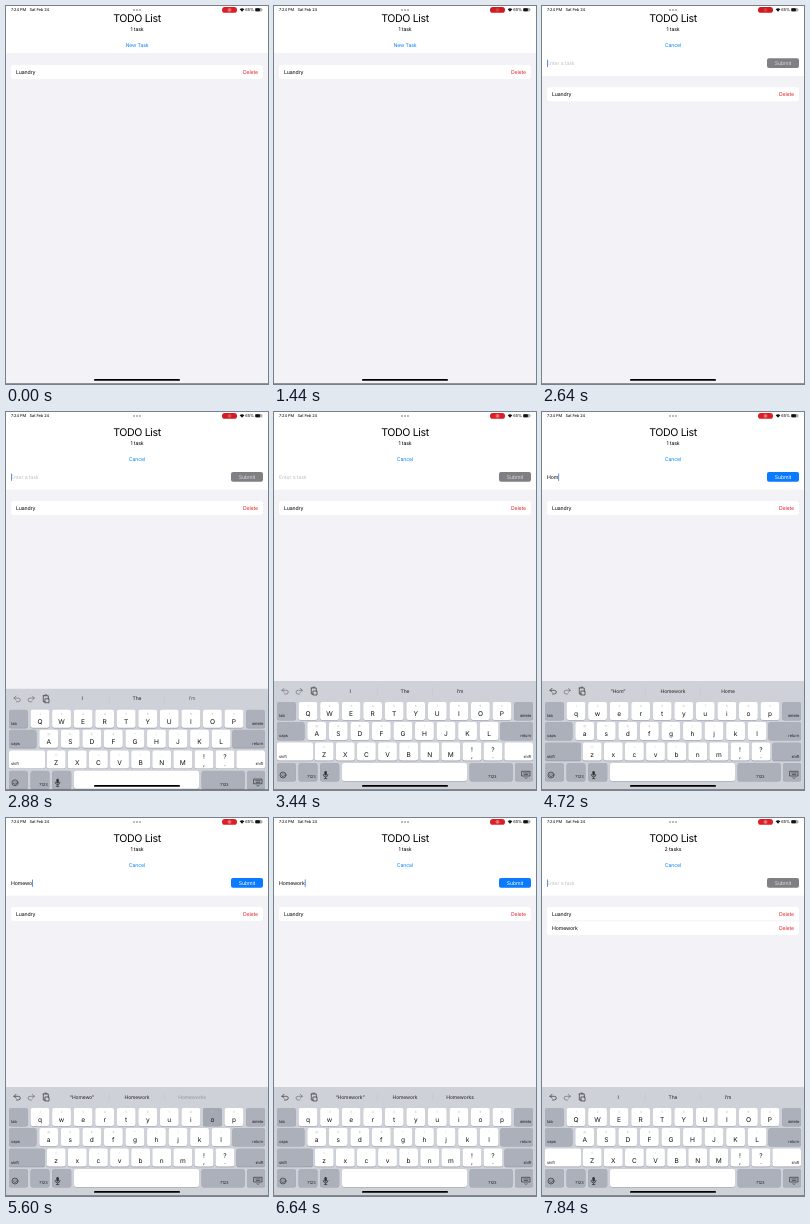
Animation, 262 px wide and 378 px high, one loop 8 s. Source, as an HTML page:

```html
<!DOCTYPE html>
<html lang="en">
<head>
<meta charset="utf-8">
<title>TODO List</title>
<style>
html, body { margin: 0; width: 100%; height: 100%; overflow: hidden; background: #f2f2f7; }
svg { display: block; width: 262px; height: 378px; }
text { font: 5.2px Inter, "Liberation Sans", sans-serif; letter-spacing: -.02em; text-rendering: geometricPrecision; white-space: pre; }
.title { font-size: 10.6px; letter-spacing: -.035em; }
.status { font-size: 4px; }
.word { font-size: 5px; fill: #222; }
.letter { font-size: 6.6px; letter-spacing: 0; fill: #111; }
.hint { font-size: 3px; fill: #b8bbc2; }
.label { font-size: 4px; fill: #222; }
.icon { fill: none; stroke: #333; stroke-width: .7; stroke-linecap: round; stroke-linejoin: round; }
</style>
</head>
<body>
<svg id="stage" viewBox="0 0 262 378"></svg>
<script>
const LOOP = 8000, KEYBOARD_H = 109;
const OPEN = 1680, FOCUS = 2640, SLIDE = 2660, PRESS = 7280, ADD = 7440;
const MOD = '#abb0bb', PRESSED = '#a3a8b3';

const TYPED = [
  [3600, 'H', ['“H”', 'Have', 'Hey']],
  [4000, 'o', ['“Ho”', 'How', 'Home']],
  [4400, 'm', ['“Hom”', 'Homework', 'Home']],
  [4800, 'e', ['Home', 'Homework', 'Homes']],
  [5360, 'w', ['“Homew”', 'Homework', 'Homeworks']],
  [5520, 'o', ['“Homewo”', 'Homework', 'Homeworks']],
  [6000, 'r', ['“Homewor”', 'Homework', 'Homeworks']],
  [6400, 'k', ['“Homework”', 'Homework', 'Homeworks']]
];
const IDLE_WORDS = ['I', 'The', 'I’m'];

const stage = document.getElementById('stage');
const clamp = x => Math.max(0, Math.min(1, x));
const smooth = x => { x = clamp(x); return x * x * (3 - 2 * x); };
const set = (node, attrs) => {
  for (const k in attrs) node.setAttribute(k, attrs[k]);
  return node;
};
function el(parent, tag, attrs) {
  const node = set(document.createElementNS('http://www.w3.org/2000/svg', tag), attrs);
  parent.append(node);
  return node;
}
const group = parent => el(parent, 'g', {});
const rect = (parent, x, y, width, height, fill, rx = 0) =>
  el(parent, 'rect', { x, y, width, height, fill, rx });
const icon = (parent, d, attrs = {}) => el(parent, 'path', { d, class: 'icon', ...attrs });
const move = (node, y) => set(node, { transform: `translate(0 ${y})` });
function text(parent, x, y, str, cls = '', anchor = 'start', fill = '') {
  const node = el(parent, 'text', { x, y, class: cls, 'text-anchor': anchor });
  if (fill) node.setAttribute('fill', fill);
  node.textContent = str;
  return node;
}
function write(node, str) {
  if (node.textContent !== str) node.textContent = str;
}

// Page
rect(stage, 0, 0, 262, 378, '#f2f2f7');
const header = rect(stage, 0, 0, 262, 47, '#fff');
const page = group(stage);
text(page, 131, 16.2, 'TODO List', 'title', 'middle');
const count = text(page, 131, 25.1, '1 task', '', 'middle');
const toggle = text(page, 131, 41, 'New Task', '', 'middle', '#0a84ff');

const form = group(page);
const hintText = text(form, 5, 59.4, 'Enter a task', '', 'start', '#c4c4c8');
const field = text(form, 5, 59.4, '');
const caret = rect(form, 5, 53.6, .9, 7.6, '#5b82d6', .4);
const button = rect(form, 225, 52.3, 32, 9.8, '#808084', 2);
const submit = text(form, 241, 59, 'Submit', '', 'middle', '#fff');

const list = group(page);
const card = rect(list, 5, 59, 252, 14, '#fff', 3);
function taskRow(name, y) {
  const row = group(list);
  text(row, 10, y, name);
  text(row, 252, y, 'Delete', '', 'end', '#e8262c');
  return row;
}
taskRow('Luandry', 67.8);
const secondRow = taskRow('Homework', 81.8);
rect(secondRow, 10, 72.9, 247, .3, '#d4d4d8');

// Status bar
text(stage, 5, 5.3, '7:24 PM', 'status');
text(stage, 23.5, 5.3, 'Sat Feb 24', 'status');
for (const x of [128, 131, 134]) el(stage, 'circle', { cx: x, cy: 3.9, r: .75, fill: '#555' });
const pill = rect(stage, 216, 1, 15, 5.8, '#dc1f26', 2.9);
const ring = el(stage, 'circle', { cx: 223.5, cy: 3.9, r: 1.5, fill: 'none', stroke: '#fff', 'stroke-width': .5 });
const dot = el(stage, 'circle', { cx: 223.5, cy: 3.9, r: .7, fill: '#fff' });
el(stage, 'path', { d: 'M233.7 3.2Q236 1.2 238.3 3.2L236 5.8Z', fill: '#111' });
text(stage, 239.3, 5.2, '65%', 'status');
rect(stage, 249, 2, 7, 3.6, '#aaa', 1);
rect(stage, 249.3, 2.3, 4.6, 3, '#111', .8);
rect(stage, 256.4, 3.2, .6, 1.2, '#999');

// Keyboard
const keyboard = group(stage);
rect(keyboard, 0, 269, 262, 109 + 12, '#ced1d8');
const undo = icon(keyboard, 'M10 276.3L8 278.3L10 280.3M8 278.3H12.3Q14.3 278.5 14.3 280Q14.3 281.8 12.3 282H10.5');
icon(keyboard, 'M26.3 276.3L28.3 278.3L26.3 280.3M28.3 278.3H24Q22 278.5 22 280Q22 281.8 24 282H25.8', { opacity: .6 });
icon(keyboard, 'M37.3 276H42.3V279M37.3 276V282H39M38.8 275.2H40.8M39.3 279H43V283H39.3Z');
const words = [76, 131, 186].map(x => text(keyboard, x, 280.6, '', 'word', 'middle'));
for (const x of [103.5, 158.5]) rect(keyboard, x, 275, .4, 8, '#bfc3cb');

function key(x, y, w, fill = '#fff') {
  rect(keyboard, x, y + .6, w, 18, '#989ca5', 2);
  return rect(keyboard, x, y, w, 18, fill, 2);
}
const letters = {};
const PITCH = 21.55;
[
  ['qwertyuiop', '1234567890', 34, 290],
  ['asdfghjkl', '@#$&*()\'"', 42.7, 310],
  ['zxcvbnm', '%-+=/;:', 50.2, 330.6]
].forEach(([chars, hints, x0, y]) => [...chars].forEach((ch, i) => {
  const x = x0 + i * (y > 330 ? 21.1 : PITCH);
  const cap = key(x - 9.4, y, 18.8);
  text(keyboard, x, y + 5.4, hints[i], 'hint', 'middle');
  letters[ch] = { cap, glyph: text(keyboard, x, y + 14.3, ch, 'letter', 'middle') };
}));
[['!', ',', 198], ['?', '.', 219]].forEach(([top, low, x]) => {
  key(x - 9.4, 330.6, 18.8);
  text(keyboard, x, 339.5, top, 'letter', 'middle');
  text(keyboard, x, 346, low, 'letter', 'middle');
});
function modKey(x, y, w, label, right) {
  const cap = key(x, y, w, MOD);
  text(keyboard, right ? x + w - 1.8 : x + 2, y + 15, label, 'label', right ? 'end' : 'start');
  return cap;
}
modKey(3, 290, 18.8, 'tab');
modKey(240.2, 290, 18.8, 'delete', true);
modKey(3, 310, 27.4, 'caps');
modKey(226.4, 310, 32.6, 'return', true);
const shifts = [modKey(3, 330.6, 36, 'shift'), modKey(230.4, 330.6, 28.6, 'shift', true)];
modKey(3, 351, 18.8, '');
modKey(24.6, 351, 18.8, '.?123', true);
modKey(46.2, 351, 19, '');
key(68, 351, 125);
modKey(195.6, 351, 43, '');
text(keyboard, 218, 366, '.?123', 'label', 'middle');
modKey(241, 351, 18, '');
el(keyboard, 'circle', { cx: 9, cy: 363, r: 3, class: 'icon' });
icon(keyboard, 'M7.4 363.8Q9 365.6 10.6 363.8M8 361.9V362.2M10 361.9V362.2');
rect(keyboard, 50.4, 359, 2.4, 4.6, '#333', 1.2);
icon(keyboard, 'M49.2 362.4Q49.4 365 51.6 365Q53.8 365 54 362.4M51.6 365V366.6M50.3 366.6H52.9');
icon(keyboard, 'M248 359.3H256V364H248ZM249.6 361H254.4M250.2 362.6H253.8M251 365.6L252 366.6L253 365.6');

rect(stage, 88, 373, 86, 1.8, '#000', .9);
rect(stage, 0, 377.4, 262, .6, '#555');

function render(t) {
  const open = t >= OPEN, added = t >= ADD;
  const strokes = TYPED.filter(k => t >= k[0]);
  const last = strokes[strokes.length - 1];
  const typing = last && !added;
  const value = typing ? strokes.map(k => k[1]).join('') : '';

  // Layout
  const lift = 7.7 * smooth((t - 2680) / 160);
  move(page, lift);
  move(list, open ? 22.2 : 0);
  set(header, { height: (open ? 70 : 47) + lift });
  set(form, { visibility: open ? 'visible' : 'hidden' });
  write(toggle, open ? 'Cancel' : 'New Task');
  write(count, added ? '2 tasks' : '1 task');
  const grow = smooth((t - ADD) / 280);
  set(card, { height: 14 + 14 * grow });
  set(secondRow, { opacity: grow });

  // Field and button
  write(field, value);
  set(hintText, { opacity: value ? 0 : 1 });
  set(button, { fill: value ? '#0a7aff' : '#808084', opacity: typing && t >= PRESS ? .5 : 1 });
  set(submit, { opacity: value ? 1 : .72 });
  const since = t - (added ? ADD : last ? last[0] : FOCUS);
  const blink = since % 1000;
  set(caret, {
    x: 5 + (value ? field.getComputedTextLength() : 0),
    opacity: t < FOCUS ? 0 : Math.max(1 - clamp((blink - 480) / 120), clamp((blink - 900) / 100))
  });

  // Keyboard
  const s = Math.max(0, t - SLIDE) * .0195;
  move(keyboard, KEYBOARD_H * (1 + s) * Math.exp(-s));
  set(keyboard, { visibility: t > SLIDE ? 'visible' : 'hidden' });
  set(undo, { opacity: last ? 1 : .6 });
  const pressed = typing && since < 160 ? last[1].toLowerCase() : '';
  for (const ch in letters) {
    write(letters[ch].glyph, typing ? ch : ch.toUpperCase());
    set(letters[ch].cap, { fill: ch === pressed ? PRESSED : '#fff' });
  }
  shifts.forEach(cap => set(cap, { fill: typing ? MOD : '#fff' }));
  words.forEach((node, i) => {
    write(node, (typing ? last[2] : IDLE_WORDS)[i]);
    const fade = i === 2 && (!typing || last[0] === 5520);
    set(node, { opacity: fade ? .3 + .7 * clamp((since - 60) / 340) : 1 });
  });

  // Recording indicator
  const p = t % 1200;
  const pulse = smooth((p - 120) / 120) - smooth((p - 440) / 120);
  set(pill, { fill: `rgb(${220 - 14 * pulse},${31 - 4 * pulse},${38 - 4 * pulse})` });
  for (const node of [ring, dot]) set(node, { opacity: .75 - .45 * pulse });
}

const start = performance.now();
function tick() {
  render((performance.now() - start) % LOOP);
  requestAnimationFrame(tick);
}
tick();
</script>
</body>
</html>
```
